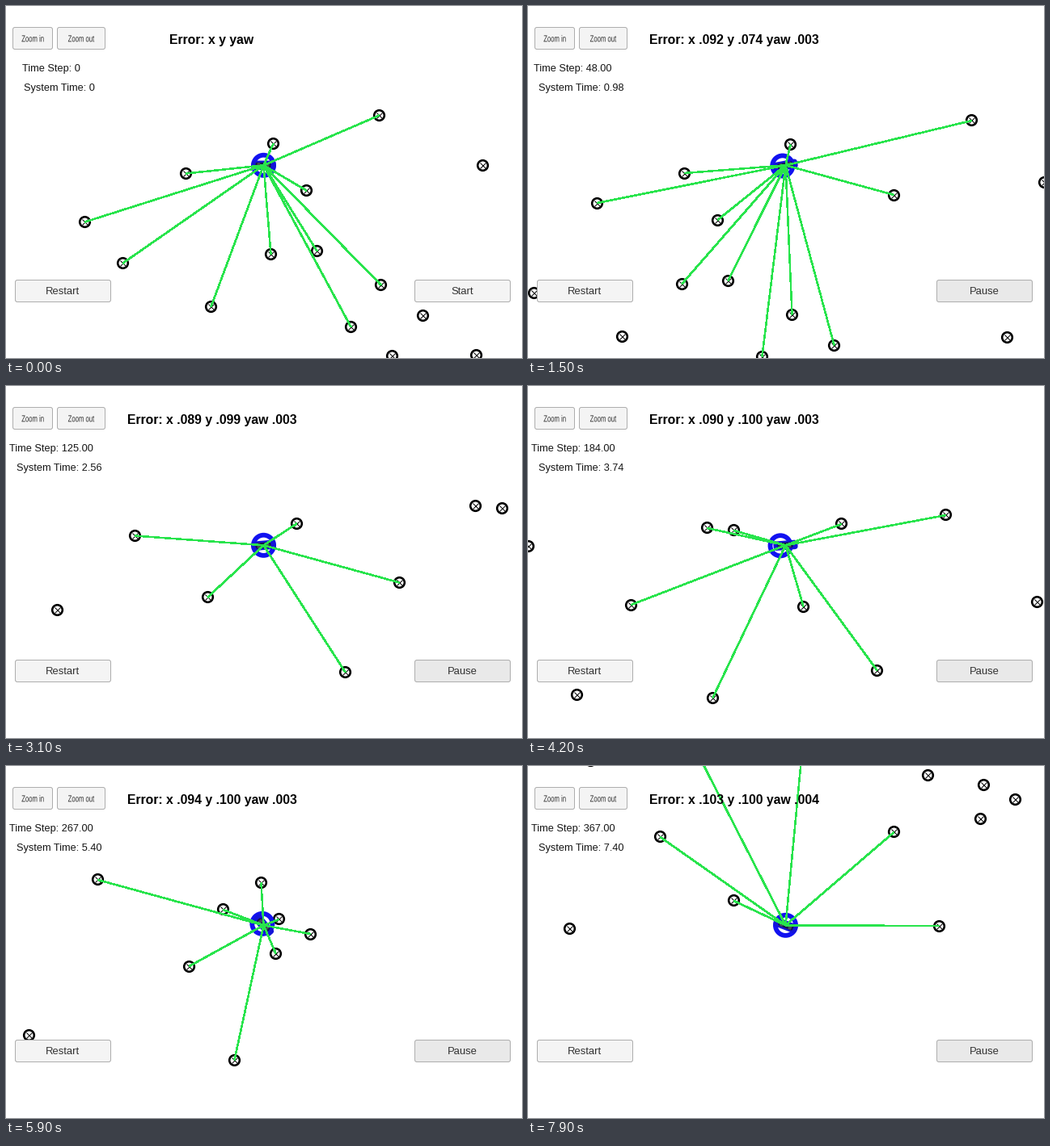
A matplotlib script that plays this animation: 638 px wide and 436 px high, repeating every 8 s.

```python
import numpy as np
import matplotlib.pyplot as plt
from matplotlib.animation import FuncAnimation
from matplotlib.collections import LineCollection
from matplotlib.patches import Circle, FancyBboxPatch, PathPatch
from matplotlib.textpath import TextPath
from matplotlib.transforms import Affine2D

W, H, DPI = 638, 436, 100
PX = 72 / DPI                      # points per pixel
FRAMES, STEP_MS = 80, 100
START = 500                        # ms before the car sets off
CAR = np.array([318.5, 197.3])     # the camera keeps the car here
SENSOR_RANGE = 246
FONT = "Liberation Sans"

# The map, left to right along the road
LANDMARKS = np.array([
    (97, 267), (144, 318), (222, 207), (253, 372), (327, 307), (330, 170),
    (371, 228), (384, 303), (426, 397), (461, 135), (463, 345), (477, 433),
    (515, 383), (581, 432), (589, 197), (685, 105), (729, 373), (775, 181),
    (885, 90), (945, 274), (1012, 163), (1106, 68), (1113, 278), (1139, 71),
    (1225, 165), (1272, 63), (1316, 244), (1401, 52), (1514, 159),
    (1556, 89), (1570, 275), (1603, 56), (1621, 143), (1625, 101),
    (1664, 119)])

# Waypoints of the drive: time, step count, x, y
ROUTE = np.array([
    (START, 0, 0, 0), (1500, 48, 137, -36.5), (3100, 125, 526, -80),
    (4200, 184, 885, -107.5), (5000, 223, 1117, -126),
    (5900, 267, 1288, -88.5), (6800, 311, 1279, 65),
    (7200, 330, 1222, 100.5), (7900, 367, 1062, 77.5)])
TIMES, STEPS, POINTS = ROUTE[:, 0], ROUTE[:, 1], ROUTE[:, 2:]
SLOPES = np.gradient(POINTS, TIMES, axis=0, edge_order=2)
SLOPES[0, 1] = 0                   # sets off straight ahead


def drive(t):
    """Position and velocity (px, px/ms) on a cubic Hermite path."""
    if t <= START:
        return np.zeros(2), np.zeros(2)
    k = min(np.searchsorted(TIMES, t) - 1, len(TIMES) - 2)
    d = TIMES[k + 1] - TIMES[k]
    u = (t - TIMES[k]) / d
    p, q, m, n = POINTS[k], POINTS[k + 1], SLOPES[k] * d, SLOPES[k + 1] * d
    a, b = 2 * (p - q) + m + n, 3 * (q - p) - 2 * m - n
    return ((a * u + b) * u + m) * u + p, ((3 * a * u + 2 * b) * u + m) / d


def short(v):
    return f"{v:.3f}"[1:]


def readout(t):
    """Texts for error, time step and system time."""
    if t <= START:
        return "Error: x y yaw", "Time Step: 0", "System Time: 0"
    step = round(np.interp(t, TIMES, STEPS))
    ex = .0893 + 2.72e-7 * (step - 140) ** 2
    ey = .1004 * np.tanh(step / 51)
    yaw = .0028 + 2.3e-6 * step
    ticks = step + (3 if step > 100 else 1)     # the clock runs 50 per second
    return (f"Error: x {short(ex)} y {short(ey)} yaw {short(yaw)}",
            f"Time Step: {step:.2f}", f"System Time: {ticks / 50:.2f}")


fig = plt.figure(figsize=(W / DPI, H / DPI), dpi=DPI, facecolor="white")
ax = fig.add_axes((0, 0, 1, 1))
ax.set(xlim=(0, W), ylim=(H, 0))
ax.axis("off")


def label(x, y, size, color="#141414", weight="normal"):
    return ax.text(x, y, "", size=size * PX, color=color, weight=weight,
                   family=FONT, ha="center", va="baseline", zorder=9)


def box(x, y, w, h, r, z, **style):
    return ax.add_patch(FancyBboxPatch(
        (x, y), w, h, boxstyle=f"round,pad=0,rounding_size={r}",
        zorder=z, **style))


def button(x, y, w):
    return box(x + .5, y + .5, w, 27, 2.5, 8,
               fc="#f4f4f4", ec="#aeaeae", lw=PX)


def narrow_label(x, y, text, size=11.5, squeeze=.67):
    path = TextPath((0, 0), text, size=size, prop={"family": FONT})
    ends = path.get_extents()
    place = Affine2D().translate(-(ends.x0 + ends.x1) / 2, 0)
    place.scale(squeeze, -1).translate(x, y)
    ax.add_patch(PathPatch(place.transform_path(path), fc="#323232",
                           lw=0, zorder=9))


def car_part(x, w, h, r, z, color):
    return box(x, -h / 2, w, h, r, z, fc=color, lw=0)


button(8, 26, 49)
button(63, 26, 59)
button(11, 339, 118)
toggle = button(505, 339, 118)
narrow_label(33, 44.3, "Zoom in")
narrow_label(93, 44.3, "Zoom out")
label(70.3, 357.4, 13, "#323232").set_text("Restart")
toggle_text = label(564.3, 357.4, 13, "#323232")
error_text = label(254.5, 47.4, 15.75, "black", "bold")
step_text = label(55.5, 81.4, 12.7)
clock_text = label(66, 105, 12.7)

rings, = ax.plot([], [], "o", ms=12.6 * PX, mew=2.6 * PX, mfc="none",
                 mec="black", zorder=1)
crosses, = ax.plot([], [], "x", ms=7 * PX, mew=PX, mec="black", zorder=1)
estimate = ax.add_patch(Circle(CAR, 12.6, fill=False, ec="#1212f0",
                               lw=5.8 * PX, zorder=3))
car = [car_part(-15, 30, 11.5, 4, 4, "#1414d8"),
       car_part(-10, 19, 7, 2, 5, "#15154c")]
car += [car_part(x, 4, 6, 1, 5.1, "#48505a") for x in (-8, 3)]
beams = ax.add_collection(LineCollection(
    [], colors="#28e44c", linewidths=1.5 * PX, antialiaseds=False, zorder=6))


def draw(i):
    t = i * STEP_MS
    pos, vel = drive(t)
    marks = LANDMARKS - pos
    rings.set_data(*marks.T)
    crosses.set_data(*marks.T)
    near = np.hypot(*(marks - CAR).T) < SENSOR_RANGE
    beams.set_segments([(CAR, m + .5) for m in marks[near]])

    # The estimate trails the car, catching up every third frame
    lag = (21, 0, 18)[i % 3]
    estimate.center = CAR - vel * lag
    turn = Affine2D().rotate(np.arctan2(vel[1], vel[0])).translate(*CAR)
    for part in car:
        part.set_transform(turn + ax.transData)

    for text, value in zip((error_text, step_text, clock_text), readout(t)):
        text.set_text(value)
    running = t > START
    toggle_text.set_text("Pause" if running else "Start")
    toggle.set_facecolor("#e9e9e9" if running else "#f4f4f4")
    return []


anim = FuncAnimation(fig, draw, frames=FRAMES, interval=STEP_MS,
                     init_func=lambda: draw(0), repeat=True, repeat_delay=0)
plt.show()
```
